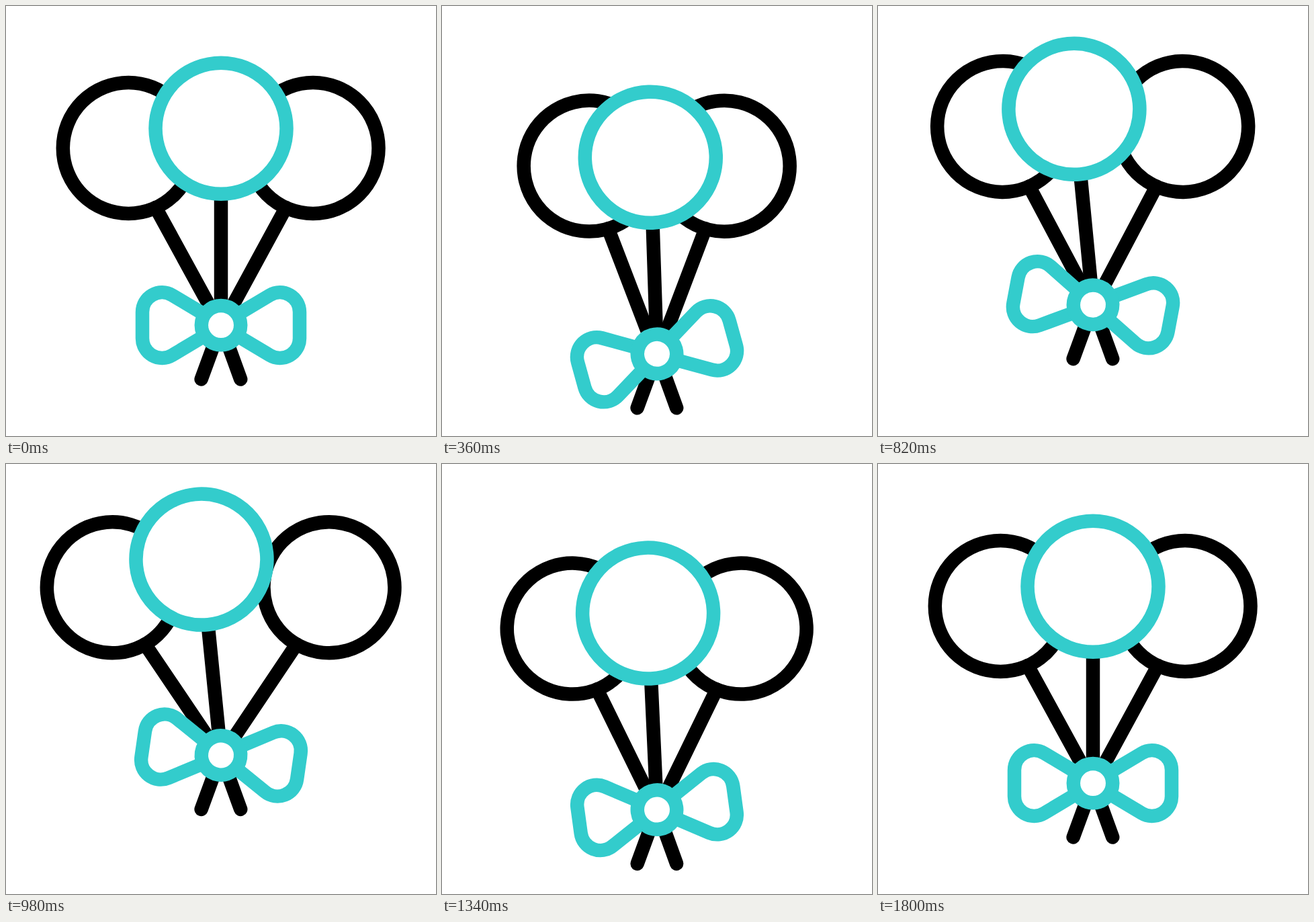
These frames come from a looping animation (640 by 640 pixels, 2400 ms). An HTML page:

```html
<!DOCTYPE html>
<html lang="en">
<head>
<meta charset="utf-8">
<title>Balloons</title>
<style>
  html, body { margin: 0; width: 100%; height: 100%; overflow: hidden; background: #fff; }
  svg { display: block; width: 100vw; height: 100vh; }
  g { fill: none; stroke: #000; stroke-width: 20.5; stroke-linecap: round; stroke-linejoin: round; }
  .teal { stroke: #3cc; }
  .white { fill: #fff; }
</style>
</head>
<body>
<svg viewBox="0 0 640 640">
  <!-- everything is placed around the knot at 0,0 -->
  <g id="bunch">
    <g id="left">
      <circle class="white" cx="-137.7" cy="-263.6" r="97.5"/>
      <path d="M-97.2 -175L-17.5 -29.5"/>
    </g>
    <g id="right">
      <circle class="white" cx="137" cy="-263.6" r="97.5"/>
      <path d="M96.6 -175L17.5 -29.5"/>
    </g>
    <g id="middle">
      <path d="M0 -195.2V-29"/>
      <circle class="teal white" cy="-292.8" r="97.5"/>
    </g>
    <path d="M-10 27.5L-29.4 80.4M10 27.5L29.2 80.4"/>
    <g id="bow" class="teal">
      <circle class="white" r="29.2" stroke="none"/>
      <path id="loop" d="M-25 -16.2L-72.6 -44.6A29.3 29.3 0 0 0 -117 -19.3V19.3A29.3 29.3 0 0 0 -72.6 44.6L-25 16.2"/>
      <use href="#loop" transform="scale(-1 1)"/>
      <circle r="29.2"/>
    </g>
  </g>
</svg>
<script>
const LOOP = 2400, STEP = 20;

// [time in ms, value] keys, eased in and out between neighbours
const tracks = {
  lift:   [[0, 0], [518, 55], [920, -46], [1360, 40], [1800, 0]],
  bow:    [[0, 0], [460, -17.6], [860, 11.4], [1320, -7.8], [1800, 0]],
  spread: [[0, 0], [570, -11.2], [995, 5.4], [1395, -3], [1800, 0]],
  sway:   [[0, 0], [935, -5.75], [1700, 0]]
};

function valueAt(keys, t) {
  const i = keys.findIndex(([time]) => time > t);
  if (i < 0) return keys[keys.length - 1][1];
  const [t0, a] = keys[i - 1], [t1, b] = keys[i];
  const s = (t - t0) / (t1 - t0);
  return a + (b - a) * s * s * (3 - 2 * s);
}

const part = id => document.getElementById(id);
const turn = (id, angle) => part(id).setAttribute('transform', `rotate(${angle})`);

function draw(t) {
  const { lift, bow, spread, sway } = Object.fromEntries(
    Object.entries(tracks).map(([name, keys]) => [name, valueAt(keys, t)]));
  part('bunch').setAttribute('transform', `translate(320 ${475.1 + lift})`);
  turn('left', -spread);
  turn('right', spread);
  turn('middle', sway);
  turn('bow', bow);
}

const start = performance.now();
function tick() {
  const t = (performance.now() - start) % LOOP;
  draw(Math.floor(t / STEP) * STEP);
  requestAnimationFrame(tick);
}
tick();
</script>
</body>
</html>
```
